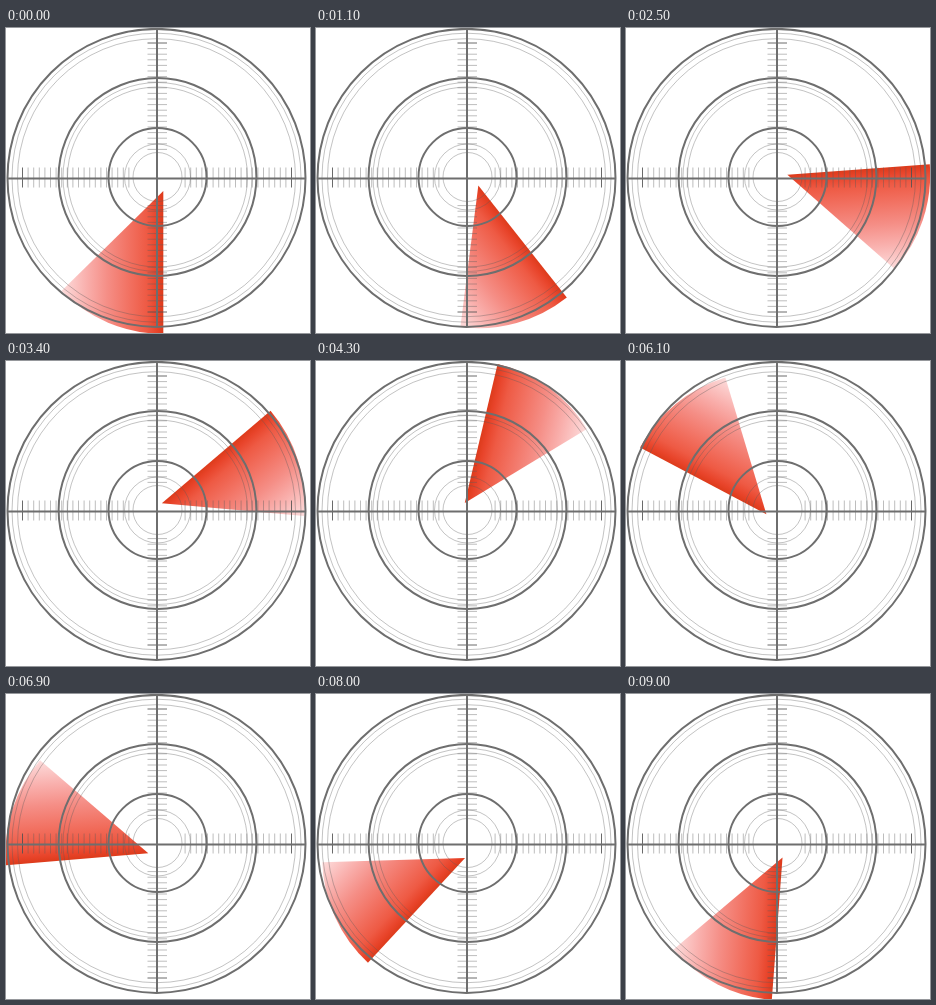
Animation, 304 px wide and 305 px high, one loop 9100 ms. Source, as an HTML page with a canvas:

```html
<!DOCTYPE html>
<html lang="en">
<head>
<meta charset="utf-8">
<title>Radar sweep</title>
<style>
html, body { margin: 0; width: 100%; height: 100%; overflow: hidden; background: #fff; }
canvas { display: block; }
</style>
</head>
<body>
<canvas id="stage" width="304" height="305"></canvas>
<script>
const ctx = document.getElementById('stage').getContext('2d');
const STEP = 100, STEPS = 91;
const PIVOT = { x: 151.8, y: 153 };
const APEX = { x: 5.5, y: 10 };
const REACH = 142.8, SPREAD = 45.5 * Math.PI / 180;

// [step, degrees turned counter-clockwise]
const TURN = [[0, 0], [10, 34.3], [25, 94.2], [43, 166.7],
              [53, 209.6], [69, 274.8], [90, 355.7], [91, 360]];

function angleAt(step) {
  const i = TURN.findIndex(k => k[0] > step);
  const [a, from] = TURN[i - 1], [b, to] = TURN[i];
  return (from + (to - from) * (step - a) / (b - a)) * Math.PI / 180;
}

// The fade runs straight across the wedge, away from its leading edge.
const fade = ctx.createLinearGradient(APEX.x, 0, APEX.x - 102, 0);
[[0, '#dd3b1b'], [0.06, '#e8442a'], [0.16, '#ee5a44'], [0.35, '#f27364'],
 [0.55, '#f58e86'], [0.75, '#f9afac'], [1, '#fddddd']].forEach(s => fade.addColorStop(...s));

function drawWedge(turn) {
  ctx.save();
  ctx.translate(PIVOT.x, PIVOT.y);
  ctx.rotate(-turn);
  ctx.beginPath();
  ctx.moveTo(APEX.x, APEX.y);
  ctx.arc(APEX.x, APEX.y, REACH, Math.PI / 2, Math.PI / 2 + SPREAD);
  ctx.closePath();
  ctx.fillStyle = fade;
  ctx.fill();
  ctx.restore();
}

function line(x1, y1, x2, y2) {
  ctx.beginPath();
  ctx.moveTo(x1, y1);
  ctx.lineTo(x2, y2);
  ctx.stroke();
}

function ring(r, x, y) {
  ctx.beginPath();
  ctx.arc(x, y, r, 0, 2 * Math.PI);
  ctx.stroke();
}

function pen(color, width) {
  ctx.strokeStyle = color;
  ctx.lineWidth = width;
}

function ticks(r) {
  for (const d of [-r, r]) {
    line(151 + d, 139.5, 151 + d, 159.5);
    line(141.5, 149.5 + d, 161, 149.5 + d);
  }
}

function drawGrid() {
  pen('rgba(90,90,90,0.36)', 1);
  [144.5, 139].forEach(r => ring(r, 150.5, 149.7));
  [94.5, 90, 33, 24.5].forEach(r => ring(r, 151.5, 149));
  pen('rgba(90,90,90,0.4)', 1);
  for (let r = 128.9; r > 28; r -= 5.6) ticks(r);
  pen('rgba(80,80,80,0.85)', 1);
  ticks(134.5);
  pen('#6e6e6e', 2);
  ring(149, 150.5, 149.9);
  ring(98.9, 151.5, 149);
  ring(49, 151.5, 149);
  line(151, 0, 151, 299);
  line(1, 150.5, 300, 150.5);
}

const start = performance.now();

function draw(now) {
  const step = Math.floor(Math.max(0, now - start) / STEP) % STEPS;
  ctx.fillStyle = '#fff';
  ctx.fillRect(0, 0, 304, 305);
  drawWedge(angleAt(step));
  drawGrid();
  requestAnimationFrame(draw);
}
draw(start);
</script>
</body>
</html>
```
